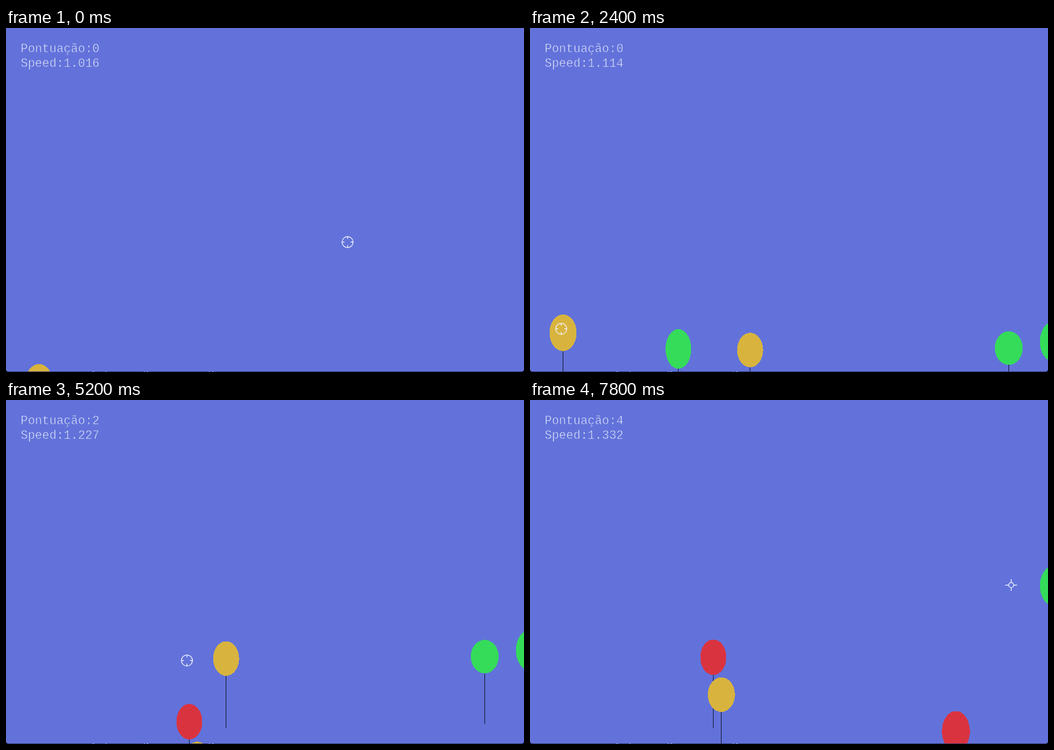
Recreate the animation shown at these times as an HTML page. Size 917 by 611 pixels, loop 8000 ms.

```html
<!DOCTYPE html>
<html lang="pt">
<head>
<meta charset="utf-8">
<title>Balões</title>
<style>
  html, body { margin: 0; width: 100%; height: 100%; overflow: hidden; background: #6272da; }
  svg { display: block; width: 917px; height: 611px; }
  /* the background-coloured outline thins the letters */
  text { font: 21.15px "Liberation Mono", "Courier New", monospace; fill: #e2e6f9; stroke: #6272da; stroke-width: .6; white-space: pre; }
  #balloons { shape-rendering: crispEdges; }
  .string { stroke: #0c0e1c; stroke-width: 1; }
  .sight { fill: none; stroke: #f0f2fc; stroke-width: 1.4; }
</style>
</head>
<body>
<svg viewBox="0 0 917 611">
  <rect width="917" height="611" fill="#6272da"/>
  <rect width="1" height="611" fill="#6a7bc4" opacity=".6"/>
  <g id="balloons"></g>
  <path d="M0 610H917V611H0Z" fill="#2b3263"/>
  <path d="M0 607Q1 610 5 611H0ZM917 607Q916 610 912 611H917Z" fill="#0a0b12"/>
  <path d="M153 610.5h3m20 0h2m66 0h2m3 0h3m107 0h2m4 0h3" stroke="#8a96d8"/>
  <text x="26" y="43" id="score"></text>
  <text x="26" y="68.5" id="speed"></text>
  <g id="sight" class="sight">
    <path id="aim" d="M-9.8 0a9.8 9.8 0 1 0 19.6 0a9.8 9.8 0 1 0 -19.6 0M-10.5 0h5M10.5 0h-5M0 -10.5v5M0 10.5v-5"/>
    <path id="shot" d="M-4.4 0a4.4 4.4 0 1 0 8.8 0a4.4 4.4 0 1 0 -8.8 0M-4.4 0h-6M4.4 0h6M0 -4.4v-6M0 4.4v6"/>
  </g>
</svg>
<script>
const LOOP = 8000, STEP = 200;
const START_SPEED = 1.01645, ACCEL = 0.04045, PX_PER_SPEED = 34.4;
const GOLD = '#d8b43e', GREEN = '#34dc5a', RED = '#da3340';
const $ = id => document.getElementById(id);

// y is the centre at time zero; pop is the second at which it is hit
const balloons = [
  { x: 58.5,  y: 629.3, rx: 24,   ry: 32.5, color: GOLD, pop: 2.6 },
  { x: 262.7, y: 658,   rx: 22.7, ry: 35.2, color: GREEN, pop: 4.4 },
  { x: 389.7, y: 659.9, rx: 23,   ry: 30.7, color: GOLD, pop: 6.2 },
  { x: 847.5, y: 656.4, rx: 24.7, ry: 29.8, color: GREEN, pop: 7.8 },
  { x: 927,   y: 645,   rx: 24.3, ry: 35.8, color: GREEN },
  { x: 324.5, y: 772,   rx: 23,   ry: 31.5, color: RED },
  { x: 338.8, y: 838.4, rx: 24,   ry: 30.7, color: GOLD },
  { x: 754,   y: 903.5, rx: 24.8, ry: 36,   color: RED }
];

// seconds, x, y
const sightPath = [
  [0, 604.7, 380.3], [1.6, 188.7, 475.3], [2.4, 55.3, 534.2], [2.6, 55.3, 534.2],
  [3.6, 219.2, 527.8], [4.4, 258.3, 495.2], [6, 382.3, 430.2],
  [6.2, 382.3, 430.2], [7.8, 851.8, 328.7]
];

function add(parent, tag, attrs) {
  const el = document.createElementNS('http://www.w3.org/2000/svg', tag);
  for (const key in attrs) el.setAttribute(key, attrs[key]);
  return parent.appendChild(el);
}

for (const b of balloons) {
  b.el = add($('balloons'), 'g', {});
  const x = Math.floor(b.x) + 0.5;
  add(b.el, 'line', { class: 'string', x1: x, x2: x, y1: b.ry - 1, y2: b.ry * 4 });
  add(b.el, 'ellipse', { cx: b.x, cy: 0, rx: b.rx, ry: b.ry, fill: b.color });
}

function sightAt(t) {
  const i = Math.max(1, sightPath.findIndex(p => p[0] >= t));
  const [t0, x0, y0] = sightPath[i - 1], [t1, x1, y1] = sightPath[i];
  const k = (t - t0) / (t1 - t0);
  return [x0 + (x1 - x0) * k, y0 + (y1 - y0) * k];
}

const show = (el, on) => el.setAttribute('visibility', on ? 'visible' : 'hidden');

function draw(ms) {
  const t = ms / 1000;
  const rise = PX_PER_SPEED * (START_SPEED * t + ACCEL * t * t / 2);
  for (const b of balloons) {
    show(b.el, !(t >= b.pop));
    b.el.setAttribute('transform', `translate(0 ${(b.y - rise).toFixed(2)})`);
  }
  $('score').textContent = 'Pontuação:' + balloons.filter(b => t >= b.pop).length;
  $('speed').textContent = 'Speed:' + (START_SPEED + ACCEL * t).toFixed(3);

  const firing = balloons.some(b => b.pop === t);
  show($('aim'), !firing);
  show($('shot'), firing);
  $('sight').setAttribute('transform', `translate(${sightAt(t)})`);
}

function tick() {
  draw(Math.floor(performance.now() % LOOP / STEP) * STEP);
  requestAnimationFrame(tick);
}
tick();
</script>
</body>
</html>
```
